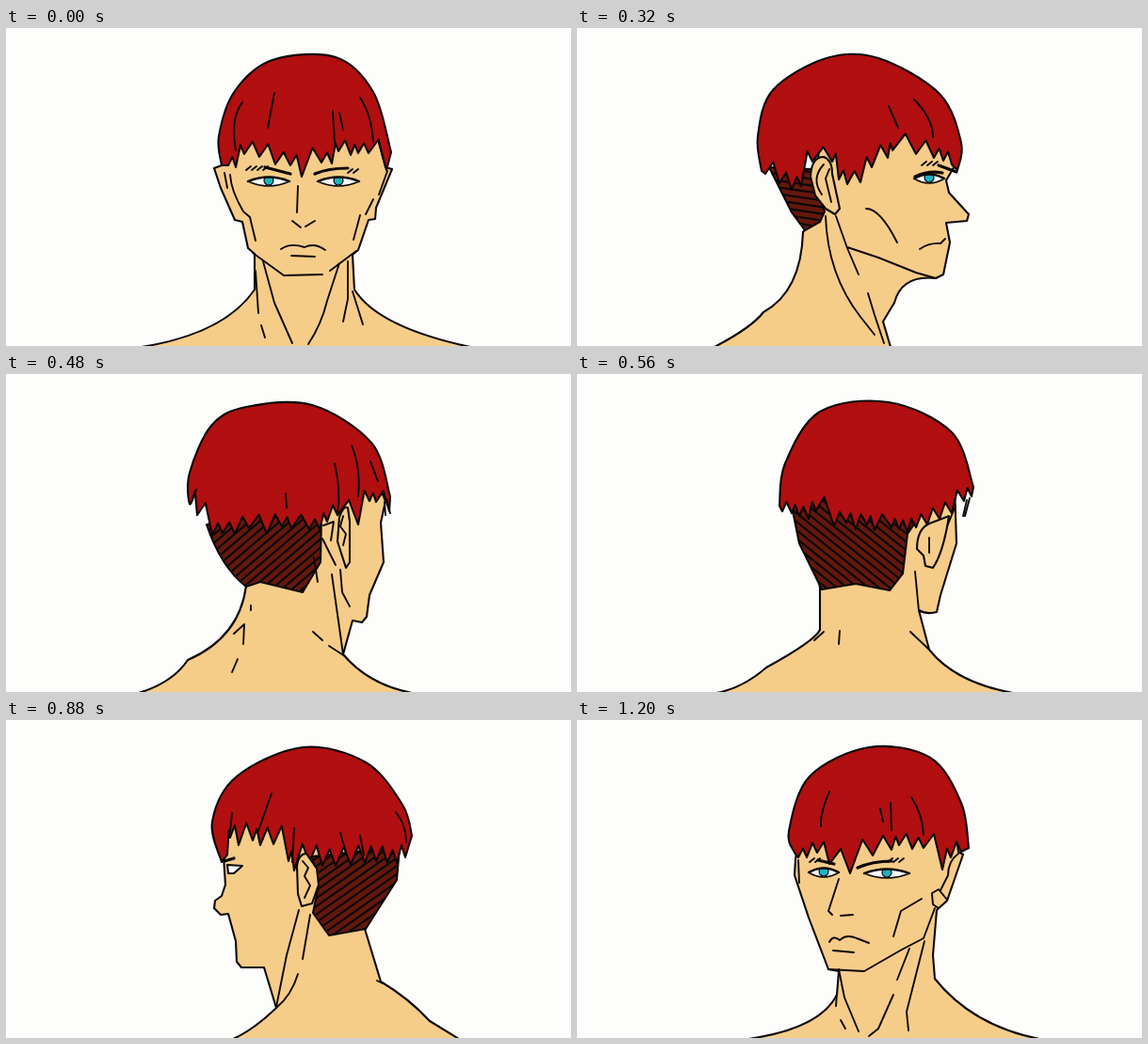
Write an HTML page with a canvas that moves like this. It is 600x338 px and loops after 1280 ms.

```html
<!DOCTYPE html>
<html lang="en">
<head>
<meta charset="utf-8">
<title>Turning head</title>
<style>
  html, body { margin: 0; width: 100%; height: 100%; overflow: hidden; background: #fdfdfc; }
  canvas { display: block; width: 100vw; height: 100vh; }
</style>
</head>
<body>
<canvas id="stage"></canvas>
<script>
const W = 600, H = 338, STEP = 80, AXIS = 318;
const PAPER = '#fdfdfc', SKIN = '#f6cc89', HAIR = '#b10f10', SHAVED = '#64180c', IRIS = '#1cb3c2', INK = '#0c0808';

const canvas = document.getElementById('stage'), ctx = canvas.getContext('2d');

function shape(d, fill, width = 2.1) {
  const path = new Path2D(d);
  if (fill) {
    ctx.fillStyle = fill;
    ctx.fill(path);
  }
  ctx.lineWidth = width;
  ctx.stroke(path);
}

const skin = d => shape(d, SKIN);
const ink = d => shape(d, null, 1.9);
const brow = d => shape(d, null, 3.2);

function points(text) {
  const n = text.split(' ').map(Number), out = [];
  for (let i = 0; i < n.length; i += 2) out.push([n[i], n[i + 1]]);
  return out;
}

// Smooth crown from left to right, then a jagged fringe back through its tips.
function hair(crown, tips, depth = .5) {
  const p = points(crown);
  let d = 'M' + p[0];
  for (let i = 0; i < p.length - 1; i++) {
    const a = p[i - 1] || p[i], b = p[i], c = p[i + 1], e = p[i + 2] || c;
    d += `C${b.map((v, k) => v + (c[k] - a[k]) / 6)} ${c.map((v, k) => v - (e[k] - b[k]) / 6)} ${c}`;
  }
  points(tips).forEach(([x, y], i, all) => {
    if (i) {
      const [px, py] = all[i - 1];
      d += `L${px + (x - px) * .45} ${Math.min(y, py) - 5 - (px - x) * depth}`;
    }
    d += `L${x} ${y}`;
  });
  shape(d + 'Z', HAIR);
}

function shaved(d, tilt) {
  shape(d, SHAVED);
  ctx.save();
  ctx.clip(new Path2D(d));
  for (let y = -200; y < 600; y += 7 * Math.hypot(1, tilt)) {
    shape(`M180 ${y - 120 * tilt}L440 ${y + 140 * tilt}`, null, 2.2);
  }
  ctx.restore();
}

function eye(x, y, w) {
  const lid = `M${x - w} ${y + 1}Q${x} ${y - 8} ${x + w} ${y + 1}`;
  const lens = lid + `Q${x} ${y + 11} ${x - w} ${y + 1}`;
  shape(lens, '#fff', 1.7);
  ctx.save();
  ctx.clip(new Path2D(lens));
  ctx.beginPath();
  ctx.arc(x, y, 5, 0, 7);
  ctx.fillStyle = IRIS;
  ctx.fill();
  ctx.lineWidth = 1.2;
  ctx.stroke();
  ctx.restore();
  shape(lid, null, 2.4);
}

function browHairs(x, y, n) {
  for (let i = 0; i < n; i++, x += 6) ink(`M${x} ${y}l5 -4`);
}

function front() {
  skin('M144 339Q232 325 264 278L264 240 257 234 251 206 243 204 228 170 221 149 229 146 240 100 390 100 403 148 410 150 393 191 392 203 385 204 374 236 368 241 370 278Q395 318 493 339');
  hair('229 146 226 115 243 67 283 34 350 31 390 68 409 132', '404 151 385 133 374 133 366 135 353 131 346 144 335 143 314 158 302 146 286 145 269 137 253 134 244 148 236 146');
  ink('M251 79Q238 96 244 130M285 69L278 106M347 88L349 122M354 90L358 108M376 74Q388 92 390 121');
  ink('M232 154L235 170M238 156Q239 173 252 195L259 201 265 226M405 152L396 177M390 182L382 198M376 199L369 225');
  ink('M262 239L295 263 336 262M344 258L372 237M310 168L309 196M304 205L313 212M318 211L328 205');
  ink('M292 235Q302 228 317 233Q328 228 339 236M303 242L328 243');
  ink('M265 258L268 303M273 248L285 292 304 335M271 316L275 329M354 250L341 290Q335 315 321 336M363 248L363 288 358 312M368 280L379 315');
  browHairs(255, 151, 4);
  browHairs(363, 154, 2);
  eye(279, 162, 22);
  eye(353, 162, 22);
  brow('M275 148L302 155M328 155Q342 149 363 149');
}

function slight() {
  skin('M182 339Q258 328 276 292L278 267 267 265 246 210 231 165 232 148 240 100 400 100 405 140 410 143 393 192 382 202 378 250 380 275Q420 325 491 339');
  hair('231 141 225 118 247 60 310 29 375 40 408 88 416 136', '408 140 397 146 388 159 368 136 356 137 342 133 334 138 314 144 290 163 268 153 255 141 244 146 235 146');
  ink('M268 76Q258 100 259 113M322 94L325 108M333 88L334 117M355 82Q367 100 368 122');
  ink('M235 149L236 173M405 142Q394 150 394 165L386 181M377 184L384 180 393 191M377 185L378 196 384 200');
  ink('M267 265L305 267 345 244 368 232 380 200M366 190L344 203 336 230M278 169L267 203 271 207M280 208L293 207');
  ink('M268 236Q272 228 279 234Q286 227 297 232L310 237M272 245L294 247');
  ink('M278 265L284 295 299 331M276 290L275 304M280 319L285 328M353 243L340 276M336 292L320 328 310 336M369 235L350 310 352 330');
  browHairs(247, 151, 2);
  browHairs(330, 151, 3);
  eye(262, 161, 16);
  eye(329, 162, 24);
  brow('M256 149L273 153M298 157Q314 150 334 150');
}

function quarter() {
  skin('M146 339Q184 325 204 303L239 282 249 245 235 180 238 100 390 100 402 138 395 165 398 187 390 207 384 208 377 254 370 262 357 264 353 291Q372 325 426 339');
  shaved('M214 160L235 200 243 213 250 198 231 152Z', .45);
  hair('213 177 202 112 230 55 290 30 356 44 395 83 406 140', '398 139 391 136 383 147 376 151 368 154 343 140 328 135 318 144 294 133 288 151 277 165 266 167 248 152 230 176 218 168');
  skin('M230 165Q231 147 241 146L250 165 250 184 244 187 234 180Z');
  ink('M291 96L298 117M321 78L331 108M344 103L346 124M381 93L390 121M245 130L249 147M236 154L242 157 238 165 245 169 242 180');
  ink('M249 195L256 222M254 222L300 240 344 265 370 262M379 165L388 188 386 196M361 204L377 209 373 213M270 193L291 204 308 222');
  ink('M336 236Q352 227 367 231L375 227M352 244L373 241 374 231');
  ink('M250 222L263 270M267 277Q284 300 288 328M270 239L291 280M298 300L303 325 314 336M352 292L343 308 340 334');
  browHairs(321, 149, 3);
  eye(335, 161, 23);
  eye(388, 161, 10);
  brow('M341 149L363 152M381 157L398 150');
}

function nearSide() {
  skin('M146 339Q189 322 205 301Q243 282 245 217L250 185 248 90 395 100 402 140 394 164 410 194 407 204 390 208 390 230 384 259 374 265 356 266 345 292Q351 325 393 339');
  shaved('M209 155L231 198 243 214 257 192 242 152Z', .35);
  hair('205 163 196 120 218 56 285 29 362 43 398 87 405 145', '397 142 388 139 377 143 364 147 347 136 332 134 318 142 307 140 295 155 282 166 271 163 247 148 234 172 222 172 206 152');
  skin('M241 158Q242 141 252 141Q260 145 260 158L265 187 258 193 244 177Z');
  ink('M311 89L318 111M326 80L337 105M351 90L362 118M369 84L384 119M250 149L246 158 253 164 256 183');
  ink('M263 199L275 228M270 228L311 241 374 265M257 210Q262 260 290 297L303 329M275 232L295 271M304 290L320 334M345 292L338 310 341 332');
  ink('M288 193L304 200 324 225M374 207L389 208M352 236Q368 228 387 225M362 245L385 240');
  browHairs(344, 147, 3);
  eye(355, 160, 20);
  brow('M363 148L384 153M391 156L400 151');
}

function side() {
  skin('M146 339Q186 318 198 302Q238 280 240 217L258 195 255 90 395 100 402 145 392 162 395 175 416 198 414 205 392 207 396 228 389 262 381 266Q345 262 337 292L325 312 333 339');
  shaved('M204 148L228 196 242 215 258 206 263 195 248 150Z', .15);
  hair('196 152 192 115 208 66 265 32 320 32 385 70 408 122 404 151', '398 145 389 141 379 138 360 134 335 130 330 138 313 148 301 164 287 166 278 161 271 142 250 142 238 168 228 172 215 165 200 155');
  skin('M248 158Q249 137 262 137Q271 140 271 155L279 192 274 198 264 192 253 178Z');
  ink('M331 83L341 106M358 76Q378 96 378 116M262 145Q248 160 260 177M268 150L264 160 270 185');
  ink('M264 200Q266 262 301 307L316 326M275 200L287 234 299 262M287 233L320 244 360 260 381 266M309 282L316 305 326 335');
  ink('M364 235Q374 228 386 229L391 224M307 192Q322 192 340 228');
  browHairs(366, 146, 3);
  eye(374, 159, 16);
  brow('M384 146L403 153M359 158Q374 151 388 154');
}

function backQuarter() {
  skin('M141 339Q177 328 193 304Q248 280 255 225L262 110 388 100 403 135 398 158 401 200 386 235 383 258 378 264 368 262 358 298Q385 330 431 339');
  shaved('M213 160Q228 205 255 226L270 221 315 232 334 200 335 150 300 145Z', -.85);
  hair('202 123 195 138 195 105 218 55 255 35 325 33 388 73 408 130', '407 146 393 136 386 135 374 160 352 150 341 157 333 165 322 165 303 164 293 162 277 170 258 164 243 170 230 169 219 171 203 150 198 132');
  skin('M354 152Q358 140 363 142L365 157 365 200 361 206 352 178Z');
  ink('M349 95Q356 125 352 148M367 76Q377 100 374 130M387 93L395 114M297 127L298 142M404 133L408 148M402 136L403 150');
  ink('M337 161L348 157 345 177M358 151L355 162 361 170 358 182M336 175L350 203M327 195L331 221M346 213L358 298M355 208L357 232 365 247');
  ink('M260 246L260 251M242 276L253 266 252 287M246 303L240 317M326 274L336 283M343 289L360 300');
}

function offBack() {
  skin('M173 339Q234 328 262 293L273 251Q265 256 254 253L250 235 233 180 235 120 390 100 378 228 378 272Q384 284 435 312Q460 334 488 339');
  shaved('M275 155L285 170 290 212 304 230 340 223 376 229 400 180 408 140 380 132 300 145Z', -.8);
  hair('215 120 238 62 305 30 378 40 415 95 421 140', '418 146 408 148 400 151 390 154 382 145 363 162 350 158 340 165 328 160 320 166 302 163 294 165 285 168 276 163 264 160 251 154 238 148 225 135 217 130');
  skin('M241 151L262 159Q275 165 275 186L268 193 266 204 258 206Q247 190 241 151Z');
  ink('M219 132L224 151M222 134L226 151M262 174L262 190M277 210L273 252M282 274L262 293M357 273L358 287M374 274L384 283M234 140L243 162');
}

function back() {
  skin('M143 339Q200 326 220 308Q262 288 262 270L264 220 285 110 351 110 372 220 374 270Q376 288 418 308Q440 328 493 339');
  skin('M227 150L221 155 229 190 236 198 239 187ZM409 150L415 155 407 190 400 198 397 187Z');
  shaved('M227 140L234 172 264 230 318 222 372 230 402 172 409 140Z', -.75);
  hair('213 138 242 53 318 28 394 53 423 138', '414 148 402 156 389 160 376 161 361 166 347 163 334 167 317 168 304 164 290 163 276 166 260 164 248 158 236 157 224 149');
  ink('M263 268L254 284M373 268L382 284M318 272L318 286');
}

function farSide() {
  skin('M241 339Q262 330 287 306L274 263 250 263 245 257 244 235 236 206 228 207 221 200 222 192 229 187 233 175 231 145 242 95 390 95 381 222 398 278Q428 296 450 320L481 339');
  shaved('M325 145L331 180 326 205 343 229 382 222 415 170 418 135Z', -.7);
  hair('229 151 219 108 245 60 315 29 382 45 421 90 431 123', '424 146 415 152 405 152 393 150 381 152 366 154 350 155 336 155 322 151 306 160 300 150 284 132 270 133 262 128 247 133 238 125 235 143', .9);
  skin('M309 155Q311 142 319 142L330 158 332 175 325 195 314 198 310 185Z');
  ink('M282 78L268 118M240 99L238 119M306 115L304 151M355 120L361 141M376 123L380 143M414 98Q425 111 425 130');
  ink('M315 150L321 157 317 166 323 176 317 189M311 202L298 250 287 305M323 207L315 254M310 270Q303 293 287 306M394 277L400 280');
  shape('M235 154L251 155 242 163 236 163Z', '#fff');
  brow('M232 150L242 147');
}

const flip = pose => () => {
  ctx.transform(-1, 0, 0, 1, 2 * AXIS, 0);
  pose();
};

// One full turn in equal steps.
const turn = [front, flip(slight), quarter, nearSide, side, flip(farSide), backQuarter, flip(offBack),
  back, offBack, flip(backQuarter), farSide, flip(side), flip(nearSide), flip(quarter), slight];

function draw(pose) {
  ctx.setTransform(canvas.width / W, 0, 0, canvas.height / H, 0, 0);
  ctx.fillStyle = PAPER;
  ctx.fillRect(0, 0, W, H);
  ctx.strokeStyle = INK;
  ctx.lineJoin = ctx.lineCap = 'round';
  pose();
}

let shown = '';
function tick() {
  const i = Math.floor(performance.now() / STEP) % turn.length;
  const ratio = window.devicePixelRatio || 1;
  const w = Math.round(innerWidth * ratio), h = Math.round(innerHeight * ratio);
  const key = [i, w, h].join();
  if (key !== shown) {
    canvas.width = w;
    canvas.height = h;
    draw(turn[i]);
    shown = key;
  }
  requestAnimationFrame(tick);
}
tick();
</script>
</body>
</html>
```
